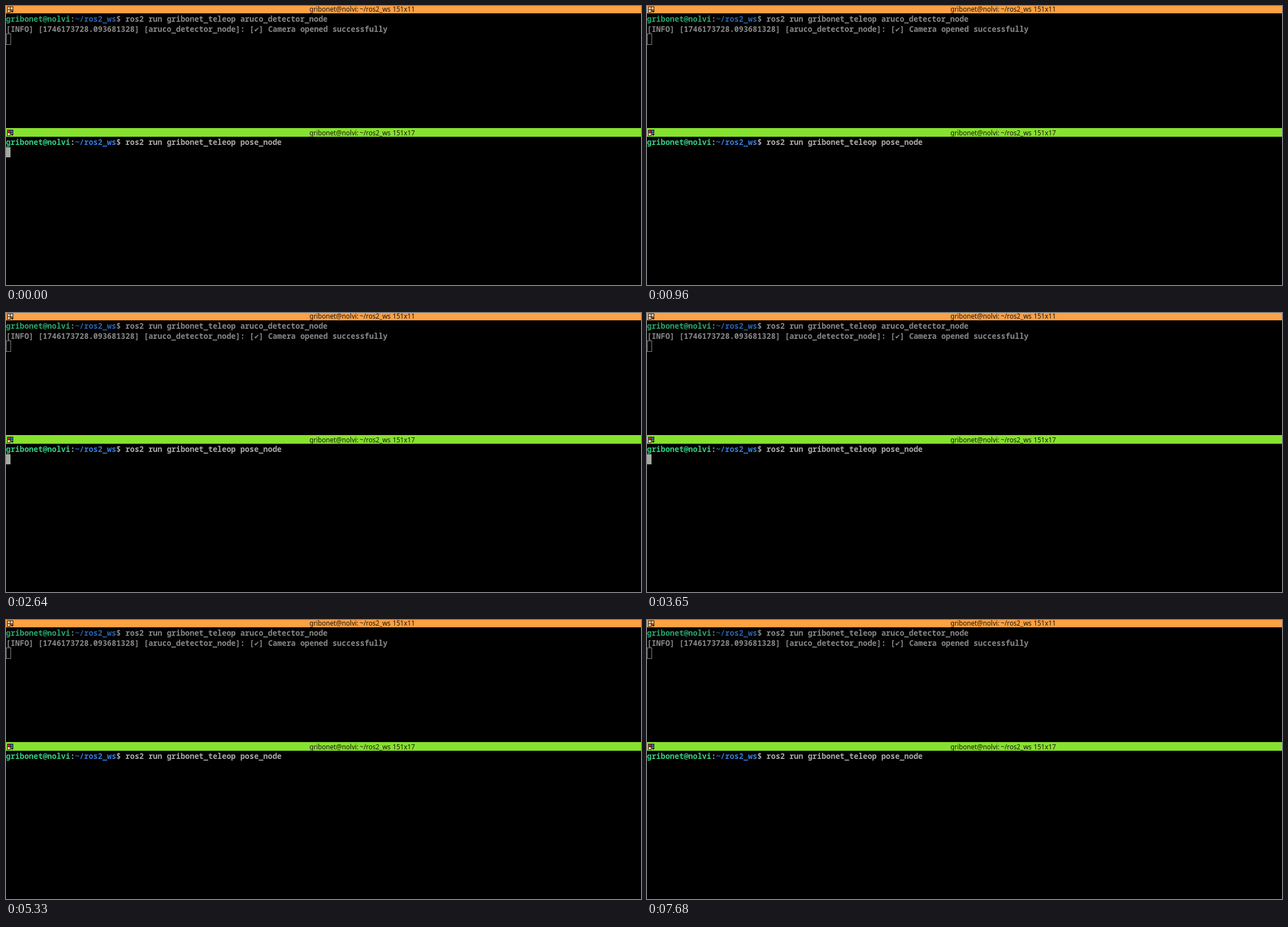
An HTML page for the animation above (8 s loop, 1130x496 px).

```html
<!DOCTYPE html>
<html lang="en">
<head>
<meta charset="utf-8">
<title>Split terminal</title>
<style>
  html, body { margin: 0; width: 100%; height: 100%; overflow: hidden; background: #000; }
  svg { display: block; width: 1130px; height: 496px; }
  text { white-space: pre; }
  .line { font: 700 13.64px "Noto Sans Mono", "DejaVu Sans Mono", monospace; }
  .title { font: 11.7px "Noto Sans", "Open Sans", sans-serif; fill: #17150f; }
  .check { font: 700 13.64px "DejaVu Sans Mono", monospace; }
  .idle { fill: #888; }
  .idle .user { fill: #29a76c; }
  .idle .path { fill: #2863ae; }
  .active { fill: #aaa; }
  .active .user { fill: #33d186; }
  .active .path { fill: #347cda; }
  .cursor { fill: #a6a9a2; animation: blink 8s step-end infinite; }
  @keyframes blink {
    0%, 33%, 75% { opacity: 1; }
    12%, 54%, 96%, 100% { opacity: 0; }
  }
</style>
</head>
<body>
<svg viewBox="0 0 1130 496">
  <defs>
    <g id="frame">
      <path d="M2 1h11v6h-5v5h-6z" fill="#1c1712"/>
      <path d="M8 8h6l-3 4z" fill="#1c1712"/>
    </g>
  </defs>

  <g class="idle">
    <rect width="1130" height="13" fill="#fea144"/>
    <use href="#frame"/>
    <path d="M3 2h4v4h-4zM8 2h4v4h-4zM3 7h4v4h-4z" fill="#e9c9a2"/>
    <g class="title">
      <text x="540" y="10">gribonet@nolvi:</text>
      <text x="629.5" y="10">~/ros2_ws</text>
      <text x="688" y="10">151x11</text>
    </g>
    <text class="line" x="0" y="28"><tspan class="user">gribonet@nolvi</tspan>:<tspan class="path">~/ros2_ws</tspan>$ ros2 run gribonet_teleop aruco_detector_node</text>
    <text class="line" x="0" y="46">[INFO] [1746173728.093681328] [aruco_detector_node]: [</text>
    <text class="check" x="441.9" y="46">✔</text>
    <text class="line" x="450.1" y="46">] Camera opened successfully</text>
    <rect x="0.5" y="49.5" width="8" height="19" fill="none" stroke="#888"/>
  </g>

  <g class="active">
    <rect y="217" width="1130" height="15.5" fill="#87e22f"/>
    <g transform="translate(0 219)">
      <use href="#frame"/>
      <path d="M3 2h4v4h-4z" fill="#d8202a"/>
      <path d="M8 2h4v4h-4z" fill="#2f62c4"/>
      <path d="M3 7h4v4h-4z" fill="#d5e8bd"/>
    </g>
    <g class="title">
      <text x="540" y="229.5">gribonet@nolvi:</text>
      <text x="629.5" y="229.5">~/ros2_ws</text>
      <text x="688" y="229.5">151x17</text>
    </g>
    <text class="line" x="0" y="247"><tspan class="user">gribonet@nolvi</tspan>:<tspan class="path">~/ros2_ws</tspan>$ ros2 run gribonet_teleop pose_node</text>
    <rect class="cursor" y="251" width="8" height="18"/>
  </g>
</svg>
</body>
</html>
```
